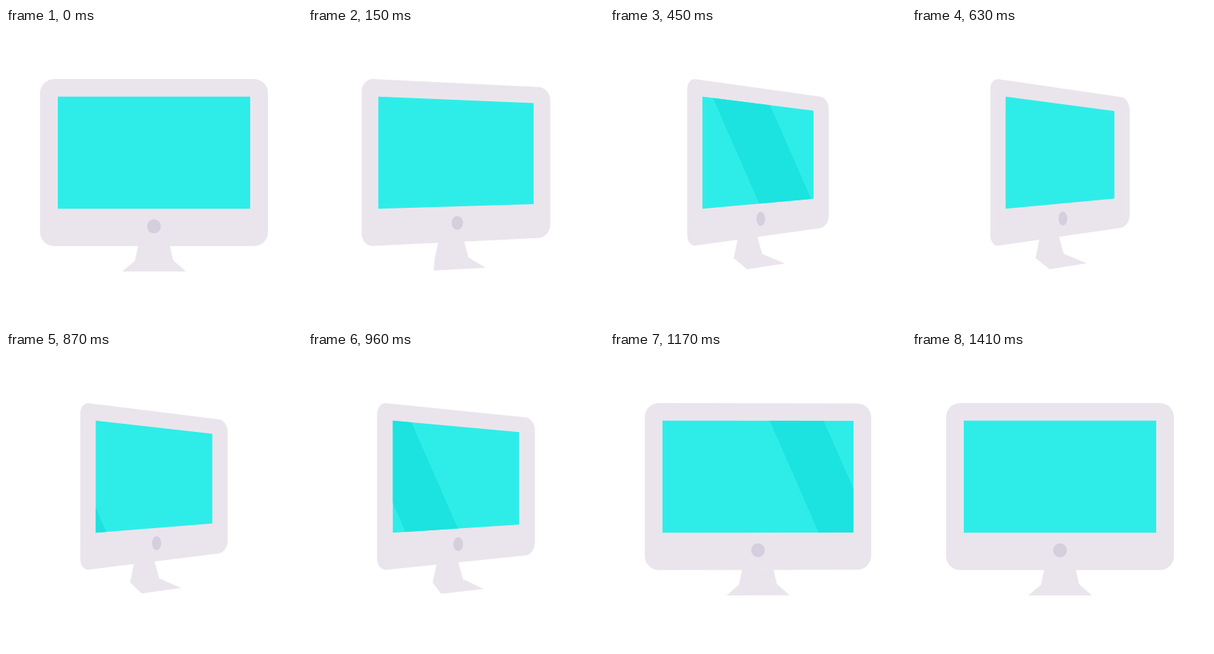
Animation, 400 px wide and 400 px high, one loop 3.62 s. Source, as an HTML page:

```html
<!DOCTYPE html>
<html lang="en">
<head>
<meta charset="utf-8">
<title>Turning monitor</title>
<style>
  html, body { margin: 0; width: 100%; height: 100%; overflow: hidden; background: #fff; }
  svg { display: block; width: 100%; height: 100%; }
</style>
</head>
<body>
<svg viewBox="0 0 400 400">
  <clipPath id="glass"><path id="clip"/></clipPath>
  <path id="stand" fill="#eae5ec"/>
  <path id="body" fill="#eae5ec"/>
  <path id="screen" fill="#2eede8"/>
  <g clip-path="url(#glass)"><path id="shine" fill="#1ce3df"/></g>
  <ellipse id="button" fill="#d5cedd"/>
</svg>
<script>
const LOOP = 3620, STEP = 30, END = 1410, HALF = 607;

const standFront = [[179, 293], [221, 293], [226, 314], [243, 329], [157, 329], [174, 315]];
const standSide = [[172.5, 284], [198, 280], [205, 305], [236, 318], [186, 326], [167, 311]];

const $ = id => document.getElementById(id);
const mix = (a, b, k) => a + (b - a) * k;
const between = (a, b, k) => a.map((v, i) => mix(v, b[i], k));
const polygon = pts => 'M' + pts.map(p => p.join(' ')).join('L') + 'Z';

function set(id, attrs) {
  for (const k in attrs) $(id).setAttribute(k, attrs[k]);
}

// cubic-bezier(.37, 0, 0, 1), solved by bisection
function ease(x) {
  let lo = 0, hi = 1;
  for (let i = 0; i < 30; i++) {
    const s = (lo + hi) / 2;
    if (1.11 * s * (1 - s) ** 2 + s ** 3 < x) lo = s; else hi = s;
  }
  return lo * lo * (3 - 2 * lo);
}

// Panel centred on the stage; its right side shrinks by the two drops.
const panel = (left, top, bottom, dropTop, dropBottom) => [
  [left, top], [400 - left, top + dropTop],
  [400 - left, bottom - dropBottom], [left, bottom]
];

function rounded(pts, rx, ry) {
  const toward = (a, b) => {
    const upright = a[0] === b[0];
    return between(a, b, upright ? ry / Math.abs(b[1] - a[1]) : rx / Math.abs(b[0] - a[0]));
  };
  const parts = pts.map((c, i) => {
    const a = toward(c, pts[(i + 3) % 4]), b = toward(c, pts[(i + 1) % 4]);
    return `${a}C${between(a, c, .55)} ${between(b, c, .55)} ${b}`;
  });
  return 'M' + parts.join('L') + 'Z';
}

// Slanted band; x is its right edge at the top of the screen.
function band(x) {
  const top = 92, bottom = 246, width = 73, low = x + (bottom - top) * .438;
  return polygon([[x - width, top], [x, top], [low, bottom], [low - width, bottom]]);
}

function draw(time) {
  const t = Math.min(END, Math.floor(time / STEP) * STEP);
  const back = t >= HALF;
  const p = ease(Math.max(0, back ? 2 * HALF - t : t) / HALF);

  const body = panel(46 + 60 * p, 69 - 1.5 * p, 294.7 + p, 27.5 * p, 27.5 * p);
  const glass = polygon(panel(70 + 56.5 * p, 92.8, 244.2, 19.5 * p, 13.8 * p));
  set('body', { d: rounded(body, 19 - 7.5 * p, 19 - 4 * p) });
  set('screen', { d: glass });
  set('clip', { d: glass });
  set('stand', { d: polygon(standFront.map((pt, i) => between(pt, standSide[i], p))) });
  set('button', {
    cx: mix(200, 203.9, p), cy: mix(268, 257.5, p),
    rx: mix(9.3, 5.9, p), ry: 9.4
  });

  // The reflection crosses once per half turn.
  const u = back ? t - HALF : t;
  set('shine', { d: band(92.5 + 351 * Math.sin((u - 293) / 456)) });
}

let start;
function tick(now) {
  start ??= now;
  draw((now - start) % LOOP);
  requestAnimationFrame(tick);
}
draw(0);
requestAnimationFrame(tick);
</script>
</body>
</html>
```
